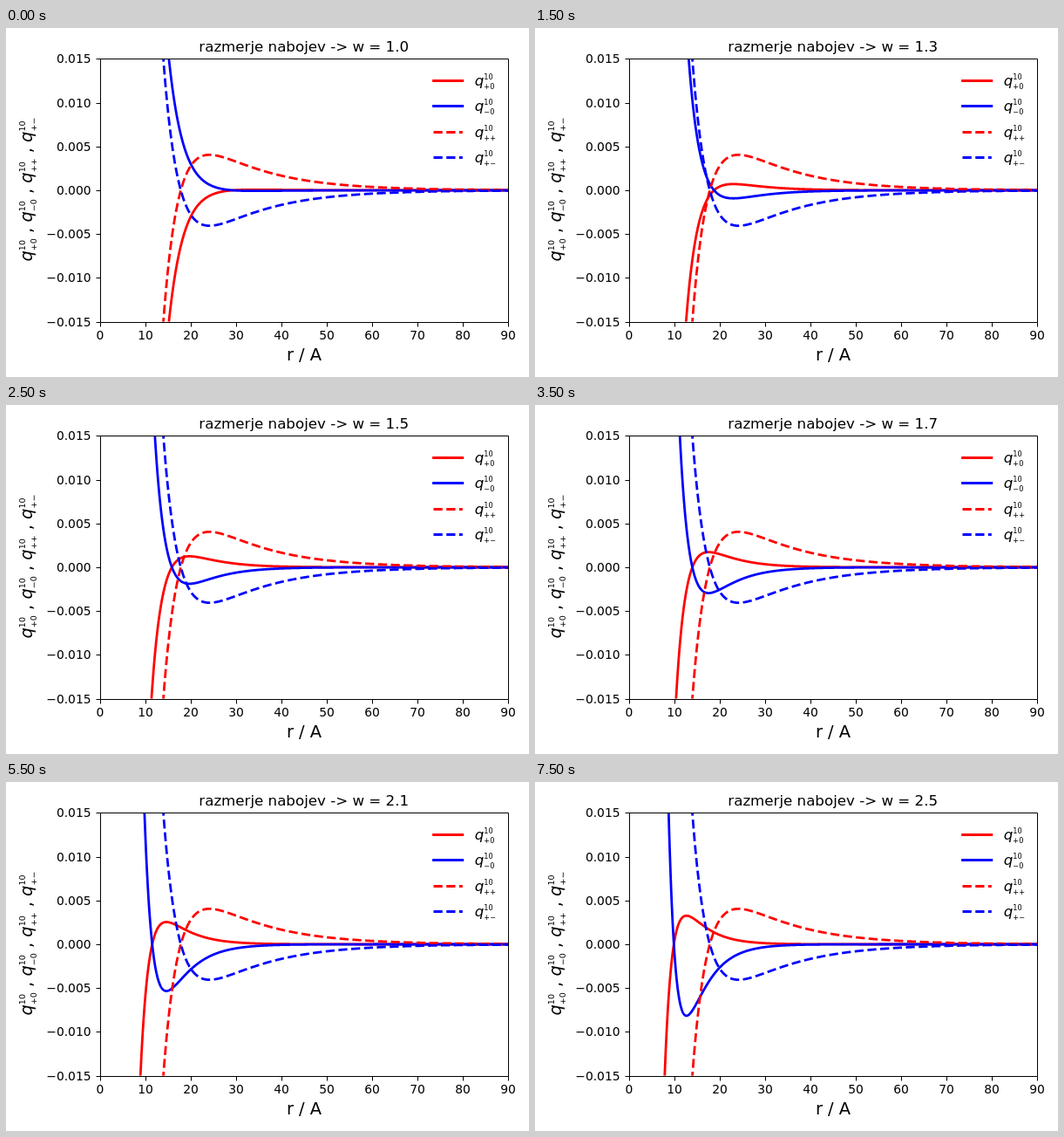
Write an HTML page with a canvas that moves like this. It is 600 by 400 pixels and loops after 8 s.

```html
<!DOCTYPE html>
<html lang="sl">
<head>
<meta charset="utf-8">
<title>razmerje nabojev</title>
<style>
  html, body { margin: 0; width: 100%; height: 100%; overflow: hidden; background: #fff; }
  canvas { display: block; width: 600px; height: 400px; }
</style>
</head>
<body>
<canvas id="plot" width="600" height="400"></canvas>
<script>
const ctx = document.getElementById('plot').getContext('2d');
const FONT = '"DejaVu Sans", sans-serif';
const RED = '#ff0000', BLUE = '#0000ff';
const LEFT = 108, RIGHT = 576, TOP = 35.4, BOTTOM = 336.6;
const MIN_Y = -1, MAX_Y = 401;
const LINE = 2.78, DASH = [10.28, 4.44];
const STEP_MS = 500, STEPS = 16;
const LABELS = ['+0', '\u22120', '++', '+\u2212'];

const px = r => LEFT + r * (RIGHT - LEFT) / 90;
const py = v => (TOP + BOTTOM) / 2 - v * (BOTTOM - TOP) / 0.03;
const snap = v => Math.floor(v + 0.5) + 0.5;

// Difference of two decays that cancels at s = 0.
const decay = (s, a, b) => Math.exp(-a * s) - Math.exp(-b * s);
const pair = r => 0.00868 * decay(r - 17.8, 0.074, 0.29);

function single(w) {
  const a = 0.06 + 0.062 * w;
  const b = 0.308 * Math.pow(w, 0.65);
  const z = (21.17 + 6.7 * Math.exp(5.3 * (1 - w))) / w + 1.4;
  const edge = 15.17 * Math.pow(w, -0.72);
  const scale = -0.015 / decay(edge - z, a, b);
  return r => scale * decay(r - z, a, b);
}

// The path, and so its dashes, begins where the curve enters the stage.
function curve(f, color, dash = []) {
  ctx.beginPath();
  let last = py(f(5));
  for (let i = 101; i <= 1800; i++) {
    const r = i / 20, y = py(f(r));
    if (y >= MIN_Y && y <= MAX_Y) {
      const limit = Math.min(MAX_Y, Math.max(MIN_Y, last));
      if (limit !== last) ctx.moveTo(px(r - 0.05 * (y - limit) / (y - last)), limit);
      ctx.lineTo(px(r), y);
    }
    last = y;
  }
  stroke(color, dash);
}

function stroke(color, dash) {
  ctx.strokeStyle = color;
  ctx.lineWidth = LINE;
  ctx.lineJoin = 'round';
  ctx.lineCap = dash.length ? 'butt' : 'square';
  ctx.setLineDash(dash);
  ctx.stroke();
  ctx.setLineDash([]);
}

function text(str, x, y, size, align = 'left', style = '') {
  ctx.font = `${style} ${size}px ${FONT}`;
  ctx.textAlign = align;
  ctx.fillStyle = '#000';
  ctx.fillText(str, x, y);
  return ctx.measureText(str).width;
}

// Symbol q with stacked superscript and subscript; returns its width.
function symbol(sub, x, y, size) {
  const q = text('q', x, y, size, 'left', 'italic');
  const small = size * 0.49;
  const up = text('10', x + q, y - size * 0.42, small);
  const down = text(sub, x + q, y + size * 0.24, small);
  return q + Math.max(up, down);
}

function axes() {
  const left = snap(LEFT), right = snap(RIGHT), top = snap(TOP), bottom = snap(BOTTOM);
  ctx.strokeStyle = '#000';
  ctx.lineWidth = 1;
  ctx.lineCap = 'butt';
  ctx.strokeRect(left, top, right - left, bottom - top);
  ctx.beginPath();
  for (let r = 0; r <= 90; r += 10) {
    ctx.moveTo(snap(px(r)), bottom);
    ctx.lineTo(snap(px(r)), bottom + 5);
  }
  for (let i = -3; i <= 3; i++) {
    const y = snap(py(i * 0.005));
    ctx.moveTo(left, y);
    ctx.lineTo(left - 5, y);
  }
  ctx.stroke();

  for (let r = 0; r <= 90; r += 10) text(String(r), px(r), 357, 13.89, 'center');
  for (let i = -3; i <= 3; i++) {
    const label = (i < 0 ? '\u2212' : '') + Math.abs(i * 0.005).toFixed(3);
    text(label, 97.6, Math.round(py(i * 0.005) + 5), 13.89, 'right');
  }
  text('r / A', 342, 381, 19.44, 'center');

  ctx.save();
  ctx.translate(30, 267.5);
  ctx.rotate(-Math.PI / 2);
  let x = 0;
  LABELS.forEach((sub, i) => {
    if (i) x += text(' , ', x, 0, 19.44);
    x += symbol(sub, x, 0, 19.44);
  });
  ctx.restore();
}

function legend() {
  LABELS.forEach((sub, i) => {
    const y = 60.3 + i * 29.4;
    const row = Math.floor(y) + 0.5;
    ctx.beginPath();
    ctx.moveTo(490.5, row);
    ctx.lineTo(523.8, row);
    stroke(i % 2 ? BLUE : RED, i > 1 ? DASH : []);
    symbol(sub, 537.8, Math.round(y + 5.6), 16.67);
  });
}

function draw(w) {
  ctx.fillStyle = '#fff';
  ctx.fillRect(0, 0, 600, 400);
  const plus = single(w);
  ctx.save();
  ctx.beginPath();
  ctx.rect(LEFT, TOP, RIGHT - LEFT, BOTTOM - TOP);
  ctx.clip();
  curve(plus, RED);
  curve(r => -w * plus(r), BLUE);
  curve(pair, RED, DASH);
  curve(r => -pair(r), BLUE, DASH);
  ctx.restore();
  axes();
  legend();
  text('razmerje nabojev -> w = ' + w.toFixed(1), 341.7, 27, 16.67, 'center');
}

const start = performance.now();
function frame() {
  const t = Math.max(0, performance.now() - start);
  draw(1 + Math.floor(t / STEP_MS) % STEPS / 10);
  requestAnimationFrame(frame);
}
frame();
</script>
</body>
</html>
```
